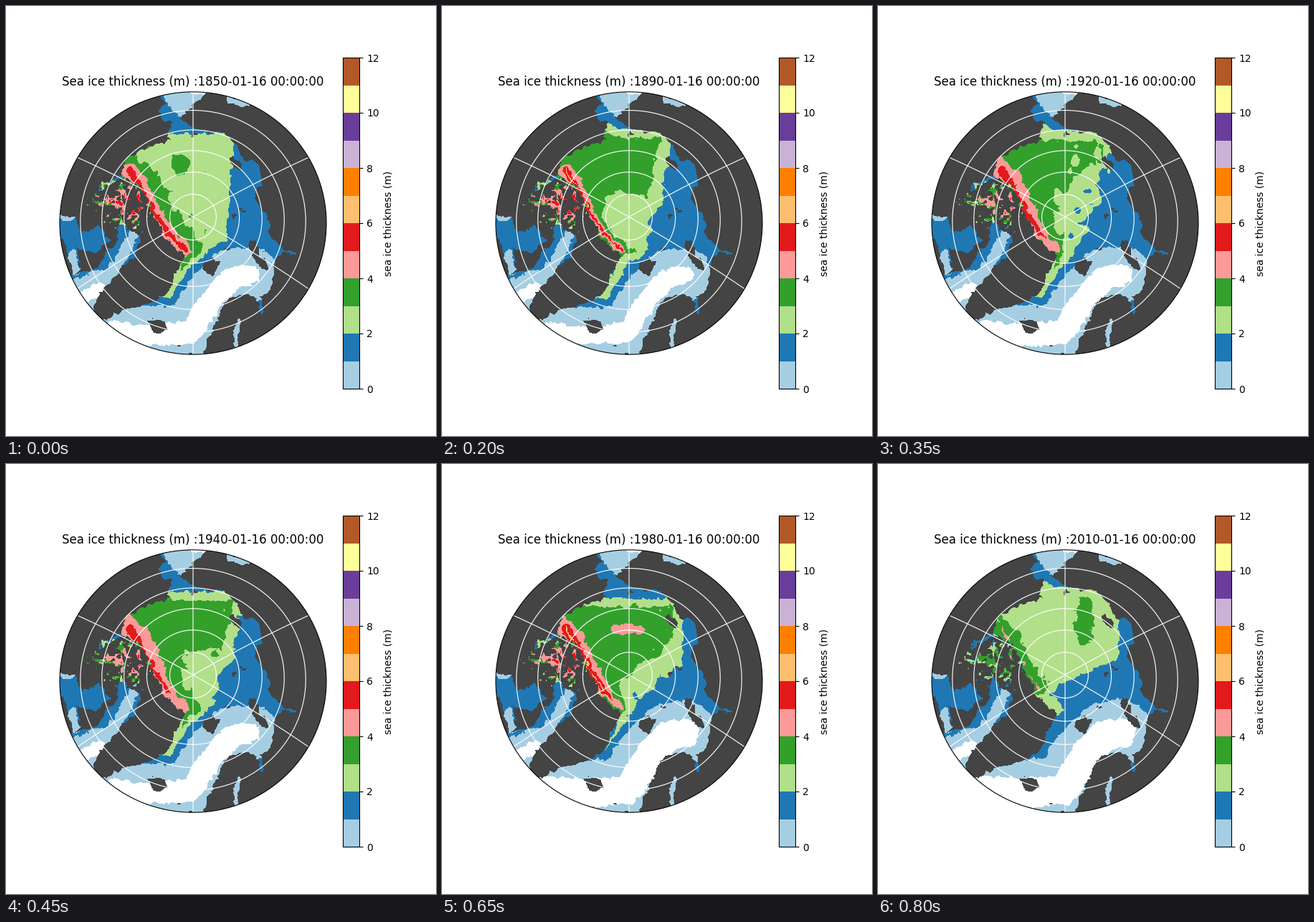
Recreate the animation shown at these times as a matplotlib script. Size 600 px wide and 600 px high, loop 850 ms.

```python
import numpy as np
import matplotlib.pyplot as plt
from matplotlib.animation import FuncAnimation
from matplotlib.cm import ScalarMappable
from matplotlib.colors import Normalize
from matplotlib.patches import Ellipse
from matplotlib.path import Path

plt.rcParams["text.kerning_factor"] = 6

W, H, X0, Y0 = 372, 368, 75, 119
CX, CY = 261, 303
RADIUS, TILT = 372, np.radians(80)
rng = np.random.default_rng(7)


def project(lon, lat):
    """Orthographic view from above 80 N, in stage pixels."""
    lon, lat = np.radians(lon), np.radians(lat)
    x = np.cos(lat) * np.sin(lon)
    y = np.cos(TILT) * (np.sin(lat) - np.sin(np.pi / 3))
    y = y - np.sin(TILT) * np.cos(lat) * np.cos(lon)
    return CX + RADIUS * x, CY - RADIUS * y


def noise(step):
    """Smooth random field with patches about `step` pixels wide."""
    n = rng.normal(size=(H // step + 2, W // step + 2))
    n = np.kron(n, np.ones((step, step)))
    k = np.ones(step) / step
    for axis in (0, 1):
        n = np.apply_along_axis(np.convolve, axis, n, k, "same")
    n = n[:H, :W]
    return n / n.std()


# Sampling points are shaken a little so that all edges come out ragged.
px, py = np.meshgrid(X0 + 0.5 + np.arange(W), Y0 + 0.5 + np.arange(H))
gx = px + 1.1 * noise(6) + 0.7 * noise(3)
gy = py + 1.1 * noise(6) + 0.7 * noise(3)
grid = np.column_stack([gx.ravel(), gy.ravel()])
patches, specks = noise(9), noise(4)


def inside(*pts):
    return Path(np.reshape(pts, (-1, 2))).contains_points(grid).reshape(H, W)


def distance(*pts):
    """Distance of every pixel to a polyline."""
    p = np.reshape(pts, (-1, 2)).astype(float)
    best = np.full((H, W), np.inf)
    for (ax, ay), (bx, by) in zip(p[:-1], p[1:]):
        dx, dy = bx - ax, by - ay
        t = np.clip(((gx - ax) * dx + (gy - ay) * dy) / (dx * dx + dy * dy), 0, 1)
        best = np.minimum(best, np.hypot(gx - ax - t * dx, gy - ay - t * dy))
    return best


def near(width, *pts):
    return distance(*pts) < width / 2


def oval(x, y, rx, ry):
    """Squared elliptic radius, 1 on the rim."""
    return ((gx - x) / rx) ** 2 + ((gy - y) / ry) ** 2


# Seas, each outlined by its main capes
basin = inside(
    237, 152, 264, 172, 300, 176, 322, 195, 333, 217, 352, 217, 356, 245,
    345, 268, 364, 295, 369, 320, 390, 341, 376, 356, 371, 390, 360, 405,
    310, 405, 297, 430, 281, 468, 275, 490, 120, 490, 100, 440, 150, 410,
    230, 345, 203, 283, 188, 250, 161, 238, 168, 212, 198, 197, 231, 188,
    225, 176)
north_strait = inside(214, 125, 245, 115, 288, 115, 264, 133, 250, 150,
                      240, 162, 222, 162, 213, 146, 223, 137)
west_bay = inside(70, 289, 97, 297, 106, 319, 130, 305, 146, 326, 125, 345,
                  100, 338, 103, 366, 96, 375, 84, 338, 72, 312)
long_bay = inside(158, 288, 168, 313, 190, 318, 165, 380, 130, 440, 90, 400,
                  88, 376, 129, 366, 138, 348, 155, 330)
south_gulf = near(7, 324, 440, 321, 474)
channels = (near(4, 130, 255, 165, 236, 172, 222)
            | near(4, 126, 274, 166, 279) | near(3, 160, 250, 164, 290)
            | (specks > 0.3 + 1.2 * oval(168, 272, 40, 32)))
gulfs = (near(9, 312, 130, 338, 138) | near(3, 372, 338, 403, 346)
         | near(5, 352, 404, 357, 427) | south_gulf)

land = (inside(188, 319, 222, 325, 249, 348, 235, 380, 222, 404, 203, 415,
               165, 423, 141, 438, 120, 432, 128, 404, 150, 378, 181, 345,
               186, 330)
        | inside(274, 362, 284, 352, 298, 358, 288, 378)
        | inside(195, 437, 222, 441, 224, 453, 208, 458)
        | near(10, 343, 332, 350, 350, 362, 364)
        | near(7, 314, 214, 326, 226))
for x, y in ((318, 292), (330, 286), (310, 339), (262, 179), (240, 474), (258, 485)):
    land |= oval(x, y, 4, 2) < 1
sea = (basin | north_strait | west_bay | long_bay | channels | gulfs) & ~land

# Lines that steer the ice: thick coast, outflow and warm currents
to_coast = distance(172, 228, 188, 250, 203, 280, 222, 312, 250, 342)
to_stream = distance(254, 345, 246, 375, 230, 405, 210, 423, 165, 427)
to_current = distance(150, 455, 200, 460, 258, 455, 290, 405, 318, 378, 338, 375)
to_ocean = distance(262, 116, 330, 116)
to_west = distance(95, 412, 128, 396)
polynyas = (near(15, 100, 387, 150, 371, 177, 320) | near(11, 76, 292, 92, 296)
            | near(10, 92, 345, 98, 370) | south_gulf)


def melt(dist, radius, width):
    """Upper limit of the thickness around a warm line."""
    d = (dist - radius) / width
    return np.where(d < 0, -0.5, d * d)


def pack(thick, front, angle, fall, blob, north, ridge, stream, inner, warm):
    """Ice thickness: a plate thinning toward a front, plus its local features.

    thick: plate thickness; it drops by `fall` per pixel and is 2 m at `front`
    blob: x, y, rx, ry and gain of one patch; north: upper limit of thick ice
    ridge: gain and reach of the coast ridge; warm: radius of open water
    """
    a = np.radians(angle)
    depth = (front[0] - gx) * np.cos(a) + (front[1] - gy) * np.sin(a)
    v = np.minimum(thick, 2 + depth * fall)
    *place, gain = blob
    v = v + gain * np.exp(-oval(*place) ** 2) + 0.12 * patches
    for room in (gy - north, 336 - gx, 354 - gy):
        v = np.minimum(v, 2 + 0.08 * room)
    v = np.maximum(v, 1.4) + ridge[0] * np.exp(-to_coast / ridge[1])
    v = np.where(basin, v, 1.4)
    v = np.maximum(v, stream - (to_stream / 7) ** 2)

    reach = np.where(gx < 178, 38, 14)
    v = np.maximum(v, inner + 0.5 * specks - oval(178, 275, reach, 18))
    for limit in (melt(to_current, warm, 25), melt(to_ocean, 7, 35),
                  melt(to_west, 9, 18)):
        v = np.minimum(v, limit)
    return np.where(polynyas, np.minimum(v, 0.5), v)


STATES = {
    1850: pack(thick=2.6, front=(312, 270), angle=5, fall=0.1, north=178,
               blob=(243, 220, 14, 17, 0.8), ridge=(3, 13), stream=3.5,
               inner=5, warm=15),
    1890: pack(thick=3.4, front=(307, 270), angle=10, fall=0.06, north=160,
               blob=(258, 302, 46, 42, -0.9), ridge=(2.8, 5), stream=3,
               inner=5, warm=13),
    1910: pack(thick=3.4, front=(292, 270), angle=22, fall=0.024, north=150,
               blob=(298, 205, 20, 25, 0.9), ridge=(2.4, 10), stream=3.2,
               inner=4.3, warm=16),
    1940: pack(thick=3.4, front=(314, 285), angle=12, fall=0.06, north=178,
               blob=(272, 308, 48, 50, -0.9), ridge=(2, 14), stream=3.2,
               inner=4.6, warm=15),
    1960: pack(thick=3.5, front=(298, 268), angle=30, fall=0.05, north=175,
               blob=(307, 298, 13, 20, 0.9), ridge=(1.9, 14), stream=2.5,
               inner=4.6, warm=16),
    1980: pack(thick=3.4, front=(315, 295), angle=55, fall=0.03, north=187,
               blob=(258, 231, 28, 9, 1), ridge=(2.8, 8), stream=2.6,
               inner=4.9, warm=20),
    2010: pack(thick=2.6, front=(300, 286), angle=65, fall=0.1, north=160,
               blob=(287, 220, 16, 38, 0.8), ridge=(1.4, 10), stream=1.8,
               inner=3.5, warm=21),
}
years, fields = list(STATES), list(STATES.values())
palette = np.array([(1, 1, 1), *plt.cm.Paired.colors, (0.267, 0.267, 0.267)])


def ice(year):
    """Map colours for a year; between known states patches drift at random."""
    k = min(np.searchsorted(years, year, "right") - 1, len(years) - 2)
    t = (year - years[k]) / (years[k + 1] - years[k])
    t = np.clip(t + 0.3 * np.sin(np.pi * t) * patches, 0, 1)
    v = fields[k] + (fields[k + 1] - fields[k]) * t
    index = np.clip(np.floor(v).astype(int) + 1, 0, 12)
    return palette[np.where(sea, index, 13)]


fig = plt.figure(figsize=(6, 6), dpi=100)
ax = fig.add_axes([0, 0, 1, 1])
ax.set(xlim=(0, 600), ylim=(600, 0))
ax.axis("off")

rim = Ellipse((CX, CY), W, W * np.sin(TILT), fc="none", ec="black", lw=0.8, zorder=4)
ax.add_patch(rim)
image = ax.imshow(ice(1850), extent=(X0, X0 + W, Y0 + H, Y0),
                  interpolation="nearest", aspect="auto")
image.set_clip_path(rim)

white = dict(color="white", lw=0.8, zorder=3, snap=False)
for lat in range(65, 90, 5):
    ax.plot(*project(np.linspace(0, 360, 181), lat), **white)
for lon in range(0, 360, 60):
    ax.plot(*project(lon, np.linspace(60, 90, 31)), **white)

title = ax.text(CX, 111, "", fontsize=12, ha="center", va="baseline")

cax = fig.add_axes([470.25 / 600, 0.11, 23.1 / 600, 0.77])
bar = fig.colorbar(ScalarMappable(Normalize(0, 12), "Paired"), cax=cax,
                   ticks=range(0, 13, 2))
bar.set_label("sea ice thickness (m)")


def update(i):
    year = 1850 + 10 * i
    image.set_data(ice(year))
    title.set_text(f"Sea ice thickness (m) :{year}-01-16 00:00:00")
    return image, title


anim = FuncAnimation(fig, update, frames=17, interval=50, repeat=True)
plt.show()
```
